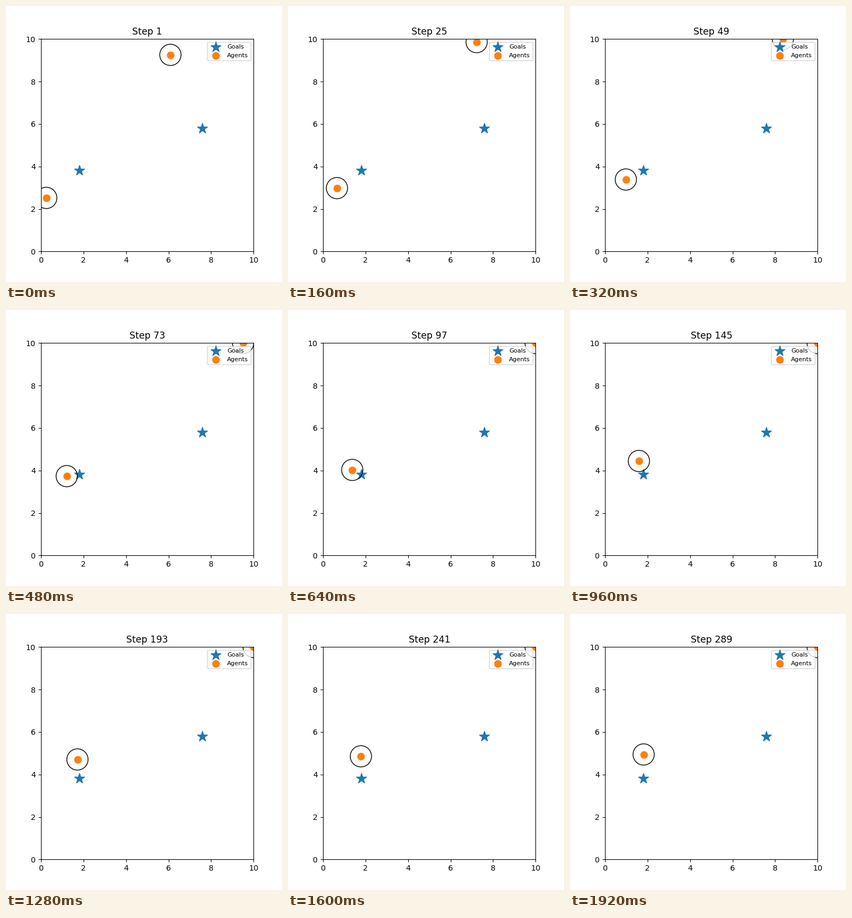
Recreate the animation shown at these times as a matplotlib script. Size 512 by 512 pixels, loop 2 s.

```python
import numpy as np
import matplotlib.pyplot as plt
from matplotlib.animation import FuncAnimation

FRAMES, INTERVAL = 25, 80
STEPS_PER_FRAME = 12
STAGE = 512
SIZE, RADIUS = 10, 0.5

GOALS = np.array([(1.80, 3.81), (7.59, 5.80)])

# Waypoints of the settling agent, evenly spaced in time
PATH = np.array([
    (0.244, 2.523), (0.977, 3.388), (1.372, 4.029), (1.591, 4.449),
    (1.711, 4.708), (1.779, 4.857), (1.814, 4.943),
])
SLOPES = np.gradient(PATH, axis=0, edge_order=2)
FRAMES_PER_LEG = 4

# The other agent drifts until the walls stop it
START = np.array([6.085, 9.255])
DRIFT = np.array([0.57, 0.30])


def settle(t):
    """Cubic Hermite curve through the waypoints."""
    leg = min(int(t), len(PATH) - 2)
    u = t - leg
    p0, p1 = PATH[leg:leg + 2]
    m0, m1 = SLOPES[leg:leg + 2]
    return ((2*u**3 - 3*u**2 + 1) * p0 + (u**3 - 2*u**2 + u) * m0
            + (3*u**2 - 2*u**3) * p1 + (u**3 - u**2) * m1)


def positions(frame):
    drifting = np.clip(START + DRIFT * frame, 0, SIZE)
    return np.array([settle(frame / FRAMES_PER_LEG), drifting])


fig = plt.figure(figsize=(5, 5), dpi=STAGE / 5)
side = 394.2 / STAGE
ax = fig.add_axes([65.1 / STAGE, 56.56 / STAGE, side, side])
ax.set_xlim(0, SIZE)
ax.set_ylim(0, SIZE)

ax.scatter(*GOALS.T, marker="*", s=190, color="tab:blue", label="Goals")
agents = ax.scatter(*positions(0).T, s=80, color="tab:orange", label="Agents")
rings = [ax.add_patch(plt.Circle(p, RADIUS, fill=False)) for p in positions(0)]
title = ax.set_title("Step 1")
ax.legend(loc="upper right", fontsize=7.9, handlelength=2.05)


def update(frame):
    points = positions(frame)
    agents.set_offsets(points)
    for ring, point in zip(rings, points):
        ring.center = point
    title.set_text(f"Step {1 + STEPS_PER_FRAME * frame}")
    return agents, *rings, title


anim = FuncAnimation(fig, update, frames=FRAMES, interval=INTERVAL,
                     repeat=True, repeat_delay=0, blit=False)
plt.show()
```
